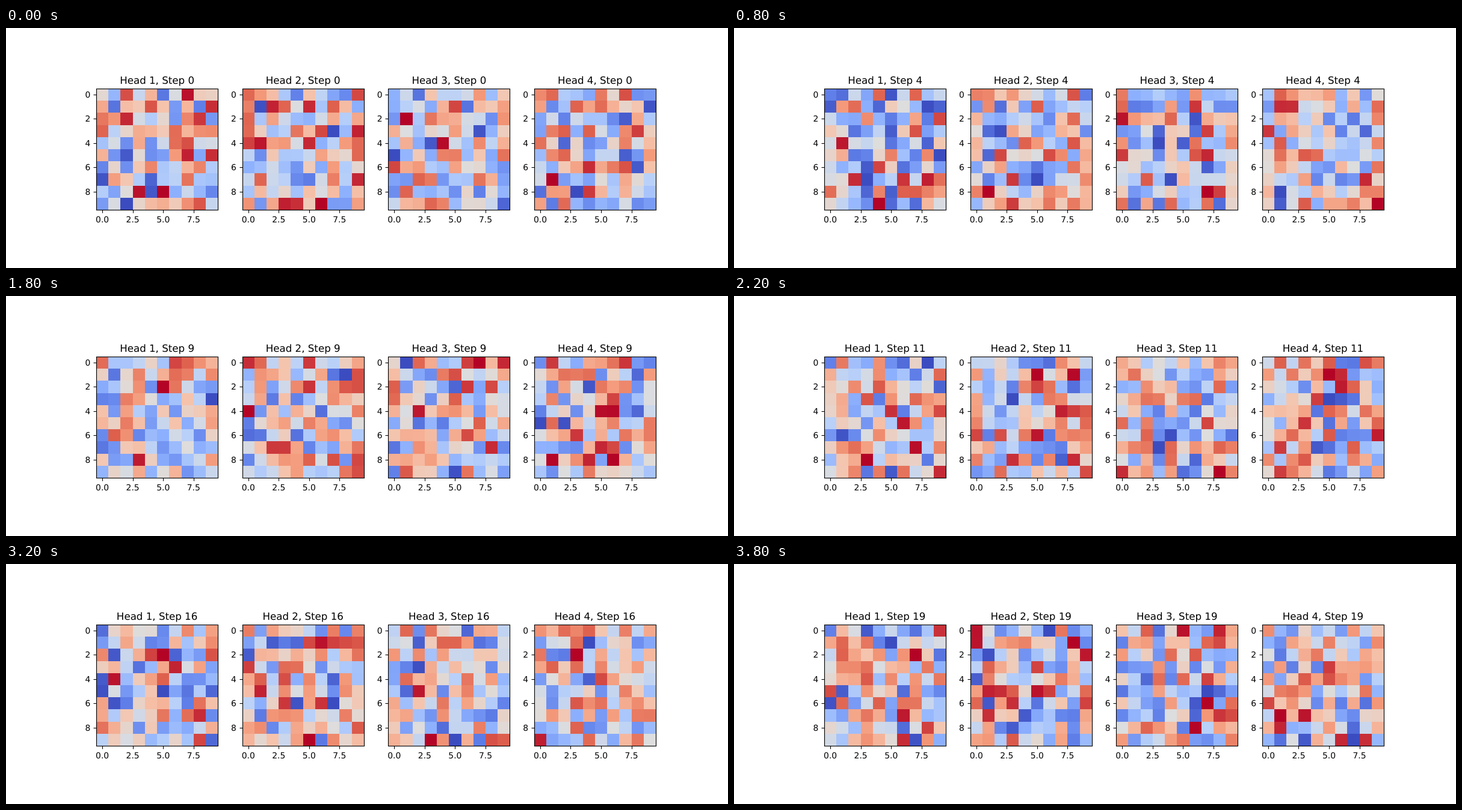
Recreate the animation shown at these times as an HTML page. Size 1200 by 400 pixels, loop 4000 ms.

```html
<!DOCTYPE html>
<html lang="en">
<head>
<meta charset="utf-8">
<title>Attention heads</title>
<style>
  html, body { margin: 0; width: 100%; height: 100%; overflow: hidden; background: #fff; }
  svg { display: block; width: 1200px; height: 400px; }
  text { font: 13.889px "DejaVu Sans", sans-serif; fill: #000; text-rendering: geometricPrecision; }
  .title { font-size: 16.667px; text-anchor: middle; }
  .x { text-anchor: middle; }
  .y { text-anchor: end; }
  .cell { shape-rendering: crispEdges; }
  .line { fill: none; stroke: #000; stroke-width: 1.11; }
</style>
</head>
<body>
<svg id="stage" viewBox="0 0 1200 400"></svg>
<script>
const HEADS = 4, SIZE = 10, STEPS = 20, STEP_MS = 200;
const LEFT = 150, PITCH = 242.609, SIDE = 202.174, TOP = 100.913;
const CELL = SIDE / SIZE;

// Diverging blue-grey-red colour scale
const SCALE = ['3b4cc0', '6282ea', '8db0fe', 'b8d0f9', 'dddddd', 'f5c4ad', 'f49a7b', 'de604d', 'b40426']
  .map(hex => [0, 2, 4].map(i => parseInt(hex.slice(i, i + 2), 16)));

const stage = document.getElementById('stage');

function add(tag, attrs, text = '') {
  const node = document.createElementNS('http://www.w3.org/2000/svg', tag);
  for (const key in attrs) node.setAttribute(key, attrs[key]);
  node.textContent = text;
  stage.appendChild(node);
  return node;
}

function colour(v) {
  const pos = v * (SCALE.length - 1);
  const i = Math.min(Math.floor(pos), SCALE.length - 2);
  const mix = SCALE[i].map((a, c) => Math.round(a + (SCALE[i + 1][c] - a) * (pos - i)));
  return `rgb(${mix})`;
}

function seeded(seed) {
  let a = Math.imul(seed + 1, 0x9e3779b1);
  return () => {
    a = (a + 0x6d2b79f5) | 0;
    let t = Math.imul(a ^ (a >>> 15), a | 1);
    t ^= t + Math.imul(t ^ (t >>> 7), t | 61);
    return ((t ^ (t >>> 14)) >>> 0) / 4294967296;
  };
}

// Random matrix stretched to the full colour range, with thin tails
function weights(head, step) {
  const rand = seeded(step * HEADS + head);
  const raw = Array.from({ length: SIZE * SIZE }, () => rand() + rand() / 4);
  const min = Math.min(...raw), max = Math.max(...raw);
  return raw.map(v => (v - min) / (max - min));
}

function buildPanel(head) {
  const left = LEFT + head * PITCH;
  const edgeX = i => Math.round(left + i * CELL);
  const edgeY = i => Math.round(TOP + i * CELL);
  const cells = [];

  for (let r = 0; r < SIZE; r++) {
    for (let c = 0; c < SIZE; c++) {
      cells.push(add('rect', {
        class: 'cell', x: edgeX(c), y: edgeY(r),
        width: edgeX(c + 1) - edgeX(c), height: edgeY(r + 1) - edgeY(r)
      }));
    }
  }

  const x0 = edgeX(0) + 0.5, y1 = edgeY(SIZE) + 0.5;
  add('rect', {
    class: 'line', x: x0, y: edgeY(0) + 0.5,
    width: edgeX(SIZE) - edgeX(0), height: edgeY(SIZE) - edgeY(0)
  });

  for (const v of [0, 2.5, 5, 7.5]) {
    const x = left + (v + 0.5) * CELL;
    add('path', { class: 'line', d: `M${Math.round(x) + 0.5} ${y1}v5` });
    add('text', { class: 'x', x, y: 324 }, v.toFixed(1));
  }
  for (const v of [0, 2, 4, 6, 8]) {
    const y = edgeY(v + 0.5);
    add('path', { class: 'line', d: `M${x0} ${y + 0.5}h-5` });
    add('text', { class: 'y', x: left - 9.72, y: y + 5 }, v);
  }

  const title = add('text', { class: 'title', x: left + SIDE / 2, y: 92.5 });
  return { cells, title };
}

const panels = Array.from({ length: HEADS }, (_, head) => buildPanel(head));
const start = performance.now();
let shown = -1;

function show(step) {
  shown = step;
  panels.forEach(({ cells, title }, head) => {
    title.textContent = `Head ${head + 1}, Step ${step}`;
    weights(head, step).forEach((v, i) => cells[i].setAttribute('fill', colour(v)));
  });
}

function tick() {
  const elapsed = performance.now() - start;
  const step = Math.floor(elapsed / STEP_MS) % STEPS;
  if (step !== shown) show(step);
  requestAnimationFrame(tick);
}
tick();
</script>
</body>
</html>
```
